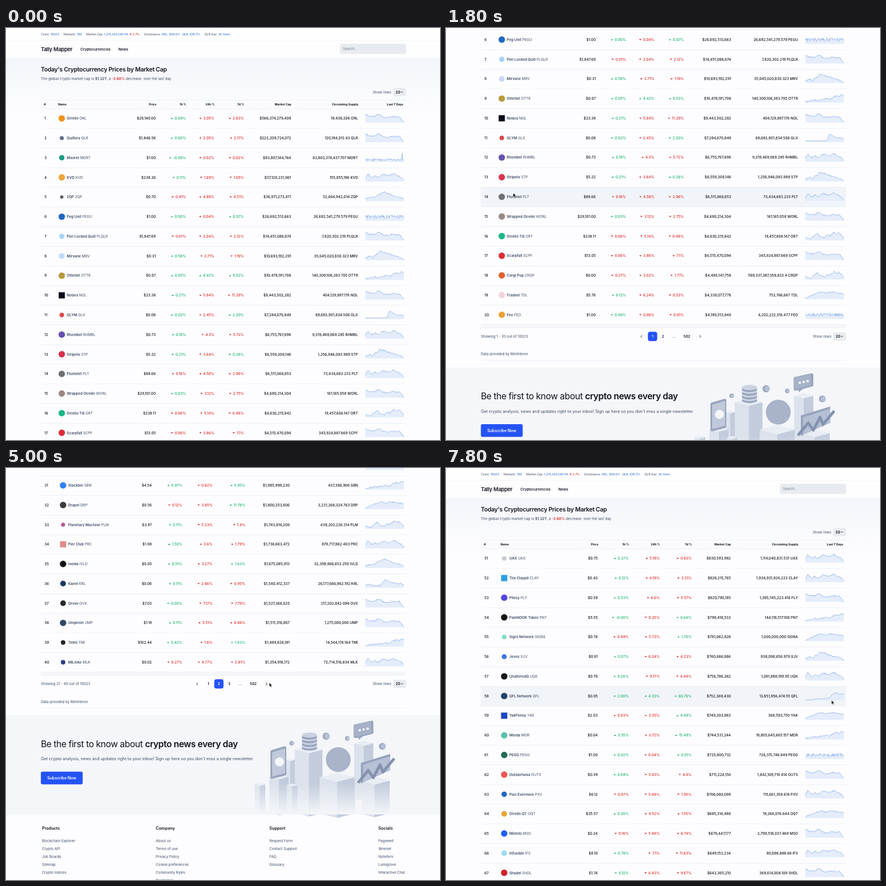
These frames come from a looping animation (768x729 px, 8000 ms). An HTML page:

```html
<!DOCTYPE html>
<html lang="en">
<head>
<meta charset="utf-8">
<title>Market table</title>
<style>
html, body { margin: 0; width: 100%; height: 100%; overflow: hidden; background: #fdfdff; }
svg { display: block; width: 100%; height: 100%; font-family: Inter, Roboto, sans-serif; }
</style>
</head>
<body>
<svg id="stage" viewBox="0 0 768 729"></svg>
<script>
const INK = '#10131c', SLATE = '#3c4962', BLUE = '#3b74d8', RED = '#e02424', GREEN = '#14b066';
const LINE = '#eceef3', CHIP = '#e8ecf0', ROW = 34.77, FIRST = 160, LOOP = 8000, STEP = 200;

function el(tag, attrs, parent) {
  const node = document.createElementNS('http://www.w3.org/2000/svg', tag);
  for (const k in attrs) node.setAttribute(k, attrs[k]);
  if (parent) parent.append(node);
  return node;
}
// Text whose capitals are centred on y; parts may be strings or { s, a }.
function text(parent, x, y, parts, size = 6.3, attrs = {}) {
  const node = el('text', { x, y: y + size * .36, 'font-size': size, fill: SLATE, ...attrs }, parent);
  for (const p of [].concat(parts)) {
    if (typeof p === 'string') node.append(p);
    else el('tspan', p.a, node).textContent = p.s;
  }
  return node;
}
const rect = (parent, x, y, width, height, fill, rx = 0) => el('rect', { x, y, width, height, fill, rx }, parent);
const rule = (parent, y) => rect(parent, 61.5, y, 646.5, .8, LINE);
const poly = (parent, points, fill) => el('path', { d: `M${points}Z`, fill }, parent);
const circle = (parent, cx, cy, r, fill) => el('circle', { cx, cy, r, fill }, parent);
const path = (parent, d, stroke, width = .9) =>
  el('path', { d, stroke, fill: 'none', 'stroke-width': width, 'stroke-linejoin': 'round' }, parent);
const show = (node, on) => node.setAttribute('display', on ? 'inline' : 'none');
const move = (node, x, y) => node.setAttribute('transform', `translate(${x} ${y})`);
const END = { 'text-anchor': 'end' }, MID = { 'text-anchor': 'middle' };
const bold = (fill = INK, weight = 600) => ({ fill, 'font-weight': weight });
const TIGHT = { 'letter-spacing': '-.025em' };

const triangle = (parent, x, y, up) =>
  poly(parent, up ? `${x - 2},${y + 1} ${x + 2},${y + 1} ${x},${y - 1.4}`
                  : `${x - 2},${y - 1} ${x + 2},${y - 1} ${x},${y + 1.4}`, up ? GREEN : RED);

function seeded(seed) {
  let s = seed * 7919 + 17;
  return () => (s = (s * 16807) % 2147483647) / 2147483647 - .5;
}

// Height profiles for the weekly charts, 0 low to 9 high.
const SHAPES = {
  M: '87666886555665630', W: '38546457766786541', H: '23344678987654432', R: '11223233443567687',
  S: '11111111118754443', N: '44444444444444444', F: '22222222222222222', C: '32135743254686752',
  P: '12345677667776665', T: '00001111122577666', J: '33322224876554442', A: '23425698866544320'
};
const ROUGH = { N: 6, F: 4, S: .8, T: 1 };

function spark(parent, y, kind, seed) {
  const shape = SHAPES[kind], rnd = seeded(seed), n = 72, rough = ROUGH[kind] || 2.4;
  let pts = '';
  for (let i = 0; i <= n; i++) {
    const u = i / n * (shape.length - 1), a = Math.min(u | 0, shape.length - 2);
    const h = +shape[a] + (shape[a + 1] - shape[a]) * (u - a);
    let py = y + 7 - h * 1.75 + rnd() * rough;
    if (kind === 'F' && i === 69) py = y - 8;
    pts += `${(636 + i / n * 68).toFixed(1)},${Math.min(py, y + 7.5).toFixed(1)} `;
  }
  poly(parent, `636,${y + 7.5} ${pts}704,${y + 7.5}`, '#e5edfb');
  path(parent, 'M' + pts, '#7ba4e4', .7);
}

// name | ticker | price | 1h | 24h | 7d | cap | supply | badge | chart
const TOP = `
Orrelin|ORL|29,140.00|+0.04|-3.05|-2.63|566,374,279,409|19,438,206|f0921e|M
Quillora|QLR|1,848.56|+0.00|-2.05|-2.17|222,209,724,072|120,194,013.43|626a8a,3.6|M
Mooret|MORT|1.00|+-0.00|-0.02|-0.02|83,807,144,764|83,803,374,437.707|1c9c84,4.8|F
KVD|KVD|238.26|+0.11|-1.69|-1.65|37,128,231,961|155,855,196|eda63c|W
ZQP|ZQP|0.70|-0.41|-4.88|-4.51|36,971,273,471|52,664,942,014|5a6068,3|H
Peg Unit|PEGU|1.00|+0.00|-0.04|+0.07|26,692,513,663|26,692,541,279.579|1f66c4|N
Pier Locked Quill|PLQLR|1,847.69|-0.01|-2.04|-2.12|14,451,086,674|7,820,302.219|a6d3f5,4.6|M
Mirvane|MRV|0.31|+0.58|-3.71|-1.19|10,693,192,291|35,045,020,830.323|c6d8f6,5|A
Otterbit|OTTR|0.07|+0.05|+4.42|+8.52|10,478,191,708|140,309,106,383.705|b99a3c|R
Nolara|NOL|23.38|+0.21|-5.84|-11.29|9,443,502,282|404,129,897.176|0c0d18,s|M
GLYM|GLX|0.08|+0.02|-2.45|+2.20|7,284,670,849|89,683,901,834.506|d7474a,4|S
Rhombel|RHMBL|0.73|+0.18|-4.3|-5.72|6,755,767,696|9,319,469,069.285|6650b0|W
Stripelo|STP|5.22|+0.21|-3.64|+0.28|6,559,309,146|1,256,946,083.989|d8344c|A
Plumelet|PLT|88.66|-0.16|-4.58|-2.96|6,511,068,653|73,434,683.233|6f7074|W
Wrapped Orrelin|WORL|29,101.00|+0.03|-3.12|-2.75|4,690,214,304|161,165.058|9a8a84|M
Orrelin Till|ORT|238.11|-0.06|-5.14|-0.48|4,630,215,842|19,457,606.147|16b888|C
Scarpfall|SCPF|13.05|-0.06|-3.86|-7.1|4,515,470,094|345,924,887.669|de2c34|M
Corgi Pup|CRGP|0.00|-0.37|-3.02|-1.71|4,490,147,758|589,337,387,358,823.4|e4622c|C
Tradeel|TDL|5.76|+0.12|-6.24|-0.53|4,338,077,778|753,766,667|f0d4dc|P
Feo|FEO|1.00|+0.00|-0.06|-0.01|4,199,513,940|4,202,222,516.477|f0a038|N`;
const SECOND = `
Stackbin|SBN|4.54|+0.97|-0.62|+5.95|1,985,998,230|437,396,906|2f80f0|R
Drapel|DRP|0.56|-0.12|-3.85|+11.78|1,800,253,606|3,231,268,324.763|3c3c3e|P
Planetary Machine|PLM|3.97|+0.11|-5.23|-1.9|1,743,814,209|439,203,226.314|b05a96,3.6|C
Pier Club|PRC|1.98|+1.50|-3.6|-1.79|1,736,663,472|878,717,862.403|e08c86,s|W
Ivelda|IVLD|0.05|+0.51|-3.27|+1.63|1,675,085,913|32,399,966,653.259|111214|H
Kairel|KRL|0.06|+0.11|-2.66|-0.95|1,540,412,337|26,177,666,962.192|1c3760,5|J
Orvex|OVX|7.03|+0.00|-7.17|-7.79|1,527,366,025|217,202,842.098|26282a,5|M
Umpirion|UMP|1.19|+0.11|-5.51|-6.86|1,511,316,807|1,275,000,000|2f4764|M
Tolmi|TMI|102.44|+0.42|-1.6|+1.63|1,489,826,181|14,544,176.164|222326,4|R
MiLinko|MLK|0.02|-0.27|-4.77|-2.81|1,354,916,172|72,714,516,834|2c3f86,4|W`;
const THIRD = `
UAX|UAX|0.75|+0.27|-5.18|-0.63|830,593,982|1,114,040,831.531|c9cccf,4|W
The Claypit|CLAY|0.43|+0.12|-6.19|-3.31|828,215,765|1,934,931,926.223|2c9fe4,s|W
Pilesy|PLY|0.59|+0.53|-6.6|-5.57|820,790,185|1,395,745,223.418|5548e0|M
PaleNOOK Token|PNT|5.55|+-0.00|-0.25|+0.64|799,418,533|144,118,517.108|141414|R
Sigra Network|SIGRA|0.78|-0.49|-5.73|+1.70|781,062,828|1,000,000,000|7fdccc,4|P
Jevos|XJV|0.81|+0.07|-6.24|-4.23|760,686,886|938,098,656.979|3a76e0,4.4|A
UnalteredQ|UQX|0.70|+0.26|-9.17|-4.44|756,786,362|1,081,888,199.95|17191b|W
QFL Network|QFL|0.05|+2.00|+4.33|+60.76|752,369,430|13,851,956,474.55|23426e|T
YakPenny|YAK|2.03|-0.63|-3.35|+4.48|749,303,983|368,593,750|1c45c0,s|P
Morda|MOR|0.04|+3.35|-3.72|+15.49|744,531,244|19,805,645,665.157|58c2ac|R
PEGG|PEGG|1.00|+0.02|-0.04|+0.01|725,800,732|726,315,746.849|246a50|N
Outskirtania|OUTS|0.39|+0.09|-5.03|-4.8|711,224,150|1,842,109,719.414|ec5a50|M
Pixo Evermore|PXV|6.12|-0.07|-5.48|-1.95|708,060,099|115,661,358.614|2166c8,4.8|W
Orrelin QT|OQT|35.57|+0.20|-4.52|-1.55|685,314,488|19,266,076.644|eaa436,5|P
Mistelo|MSO|0.24|-0.16|-5.48|-6.74|679,447,177|2,799,518,037.469|2260f4|M
Infusible|IFS|8.10|+0.78|-7.1|-11.63|649,153,234|80,088,888.66|9cdcf0,5|W
Shadel|SHDL|1.74|+0.12|-6.43|-9.67|643,365,210|369,614,008.109|d02028|M`;

function buildTable(parent, data, first, count, col) {
  const g = el('g', {}, parent), rows = data.trim().split('\n'), m = { ...END, 'font-weight': 500, fill: INK };
  const head = (x, s, a = END) => text(g, x, 135, s, 5.2, { ...bold(INK, 700), ...a });
  head(67, '#', {});
  head(col.icon - 6.5, 'Name', {});
  head(col.price + 1, 'Price');
  ['1h %', '24h %', '7d %'].forEach((s, i) => head(col.pct[i] + .7, s));
  head(col.cap + .3, 'Market Cap');
  head(623.5, 'Circulating Supply');
  head(703, 'Last 7 Days');
  for (let i = 0; i < count; i++) {
    const r = rows[i % rows.length].split('|'), y = FIRST + i * ROW, [fill, kind] = r[8].split(',');
    text(g, 68, y, String(first + i), 6.3, { 'font-weight': 500, fill: INK });
    if (kind === 's') rect(g, col.icon - 5.5, y - 5.5, 11, 11, '#' + fill, .6);
    else circle(g, col.icon, y, +kind || 5.7, '#' + fill);
    text(g, col.icon + 8.9, y, [{ s: r[0], a: bold(SLATE) }, ' ' + r[1]], 6.3);
    text(g, col.price, y, '$' + r[2], 6.3, m);
    col.pct.forEach((x, j) => {
      const v = r[3 + j], up = v[0] === '+';
      const node = text(g, x, y, v.slice(1) + '%', 6.3, { ...m, fill: up ? GREEN : RED });
      triangle(g, x - node.getComputedTextLength() - 5, y, up);
    });
    text(g, col.cap, y, '$' + r[6], 6.3, m);
    text(g, 622.8, y, `${r[7]} ${r[1]}`, 6.3, m);
    spark(g, y, r[9], first + i);
    rule(g, y + ROW / 2);
  }
  return g;
}

function rowsControl(parent, y) {
  text(parent, 681.8, y, 'Show rows', 6.3, END);
  rect(parent, 685, y - 7.5, 23, 15, CHIP, 4);
  path(parent, `M698.8 ${y - .9}l1.8 1.8l1.8 -1.8`, INK);
  return text(parent, 693.5, y, '20', 6.3, { ...MID, ...bold() });
}

function pager(parent, items, active, x0, x1) {
  const g = el('g', {}, parent), y = 859;
  path(g, `M${x0 + 1} ${y - 2.3}l-2.2 2.3l2.2 2.3M${x1 - 1} ${y - 2.3}l2.2 2.3l-2.2 2.3`, INK);
  for (const [s, x] of items) {
    if (s === active) rect(g, x - 8.2, y - 8.2, 16.4, 16.4, '#2453f5', 4);
    text(g, x, y, s, 6.3, { ...MID, ...bold(s === active ? '#fff' : INK) });
  }
  return g;
}

function buildSkyline(parent) {
  const g = el('g', { transform: 'translate(0 450)' }, parent), k = .27;
  const dark = '#98a4be', mid = '#b6c0d4', pale = '#e9edf4';
  function pillar(x, y, a, b, h) {
    const fx = x + a, fy = y + a * k, rx = fx + b, ry = fy - b * k;
    poly(g, `${x},${y} ${fx},${fy} ${fx},${fy + h} ${x},${y + h}`, '#dce2ec');
    poly(g, `${fx},${fy} ${rx},${ry} ${rx},${ry + h} ${fx},${fy + h}`, '#c3ccdd');
    poly(g, `${x},${y} ${fx},${fy} ${rx},${ry} ${x + b},${y - b * k}`, pale);
  }
  pillar(616, 514, 17, 17, 122);
  pillar(495, 543, 8, 8, 94);
  pillar(511, 525, 25, 24, 112);
  for (let y = 519; y > 498; y -= 6.5) {
    for (const [dy, fill] of [[3.4, dark], [0, '#cbd3e1']])
      el('ellipse', { cx: 537, cy: y + dy, rx: 13.5, ry: 4.6, fill }, g);
  }
  pillar(466, 573, 17, 17, 64);
  poly(g, '468,528 470,526 494,519 496,522 496,569 494,571 470,577 468,575', dark);
  poly(g, '471,530 494,523 494,567 471,573', '#c0c9da');
  circle(g, 484, 547, 8, '#f4f6fa');
  pillar(555, 574, 31, 31, 64);
  circle(g, 588, 543, 22, '#a9b4ca');
  pillar(625, 580, 27, 27, 58);
  poly(g, '628,549 680,533 680,562 628,585', mid);
  poly(g, '628,549 680,533 680,537 632,552 632,583 628,585', dark);
  path(g, 'M623 584L641 562L650 575L662 552L667 565L687 541', '#8592af', 5);
  pillar(440, 587, 9, 10, 50);
  pillar(497, 588, 9, 10, 50);
  poly(g, '616,481 648,474 650,476 650,497 631,502 624,508 624,504 616,505', dark);
  poly(g, '615,482 646,476 646,496 615,503', '#a7b2c9');
  for (const i of [0, 1, 2]) circle(g, 626 + i * 7, 491 - i * 1.4, 2.2, '#f4f6fa');
  for (const [x, y, r] of [[505.5, 514, 4], [566.5, 501.5, 6.3], [604, 505.5, 4], [666, 519.5, 6]]) {
    circle(g, x, y, r, dark);
    circle(g, x + r * .25, y, r * .75, mid);
  }
  rect(g, 436, 585, 256, 55, 'url(#fade)');
  rect(g, 618, 614, 12, 26, '#f4f6f9');
}

const stage = document.getElementById('stage'), defs = el('defs', {}, stage);
function gradient(id, stops) {
  const g = el('linearGradient', { id, x2: 0, y2: 1 }, defs);
  stops.forEach(([color, alpha], i) => el('stop', { offset: i / (stops.length - 1), 'stop-color': color, 'stop-opacity': alpha }, g));
}
gradient('fade', [['#f4f6f9', 0], ['#f4f6f9', 1]]);
gradient('hero', [['#f4f5fa', 1], ['#f9fafd', 1], ['#fdfdff', 1]]);

rect(stage, 0, 0, 768, 729, '#fdfdff');
const page = el('g', {}, stage);

// Header
rect(page, 0, 0, 768, 53, '#fefeff');
rect(page, 0, 53, 768, 110, 'url(#hero)');
rect(page, 0, 21.5, 768, .8, '#f0f1f6');
[[61.7, 'Coins: ', '10023'], [102, 'Markets: ', '780'], [142, 'Market Cap: ', '1,215,207,338.44'],
 [244.5, 'Dominance: ', 'ORL: $46.6%'], [312, '', 'QLR: $18.3%'], [351.5, 'QLR Gas: ', '35 Gwei']]
  .forEach(([x, label, s]) => text(page, x, 11.3, [label, { s, a: { fill: BLUE, 'font-weight': 500 } }], 5.23));
triangle(page, 220.3, 11.3, false);
text(page, 236.8, 11.3, '2.7%', 5.23, { ...END, fill: RED, 'font-weight': 500 });
text(page, 61.7, 37.5, 'Tally Mapper', 9.4, { ...bold(), ...TIGHT });
text(page, 131.7, 37.5, 'Cryptocurrencies', 6.3, bold());
text(page, 199, 37.5, 'News', 6.3, bold());
rect(page, 590.5, 28, 117.5, 18, CHIP, 4);
text(page, 596, 37.2, 'Search...', 6.3, { fill: '#747c8a' });
text(page, 61.7, 73, "Today's Cryptocurrency Prices by Market Cap", 10.5, { ...bold(), ...TIGHT });
text(page, 61.7, 89.6, ['The global crypto market cap is ', { s: '$1.22T', a: bold(SLATE) }, ', a ',
  { s: '-2.68%', a: bold(RED) }, ' decrease\u00a0 over the last day'], 6.3);
const topRows = rowsControl(page, 113.5);

// Tables
const glow = rect(page, 61.5, 0, 646.5, ROW, '#f1f4f8');
rule(page, 127);
rule(page, 142.3);
const tables = [
  buildTable(page, TOP, 1, 20, { icon: 98.7, price: 265, pct: [318.6, 368.8, 421], cap: 504.5 }),
  buildTable(page, SECOND, 21, 20, { icon: 101, price: 258, pct: [312, 365.6, 423.5], cap: 502 }),
  buildTable(page, THIRD, 51, 50, { icon: 103, price: 268.5, pct: [323.4, 378.2, 434.7], cap: 504 })
];

// Below the table
const foot = el('g', {}, page);
rect(foot, 61.5, 838, 646.5, 6, '#f5f6f9');
rule(foot, 837.5);
rule(foot, 843.5);
const showing = text(foot, 61.7, 859, '', 6.3);
const hover3 = rect(foot, 385, 851, 16, 16, CHIP, 4);
const pagers = [
  pager(foot, [['1', 365.5], ['2', 384], ['...', 403.3], ['502', 426.3]], '1', 346, 449.5),
  pager(foot, [['1', 356], ['2', 374.7], ['3', 393], ['...', 412.3], ['502', 435.5]], '2', 336.5, 459)
];
const lowRows = rowsControl(foot, 859);
text(foot, 61.7, 890.5, 'Data provided by MintHeron', 6.3);
rule(foot, 901);
rect(foot, 0, 914, 768, 176.5, '#f4f6f9');
buildSkyline(foot);
text(foot, 61.7, 965, ['Be the first to know about ', { s: 'crypto news every day', a: { 'font-weight': 600 } }], 15.7, { fill: INK, ...TIGHT });
text(foot, 61.7, 991.3, "Get crypto analysis, news and updates right to your inbox! Sign up here so you don't miss a single newsletter.", 7.3);
rect(foot, 61.7, 1014.3, 74, 22.5, '#2453f5', 3);
text(foot, 98.7, 1025.6, 'Subscribe Now', 7, { ...MID, ...bold('#fff') });
[[63.7, 'Products', 'Blockchain Explorer', 'Crypto API', 'Job Boards', 'Sitemap', 'Crypto Indices'],
 [265, 'Company', 'About us', 'Terms of use', 'Privacy Policy', 'Cookie preferences', 'Community Ryles', 'Disclaimer'],
 [466, 'Support', 'Request Form', 'Contact Support', 'FAQ', 'Glossary'],
 [659, 'Socials', 'Pagewell', 'Wrenlet', 'Notefern', 'Lumigrove', 'Interactive Chat']]
  .forEach(([x, title, ...links]) => {
    text(foot, x, 1114, title, 7.3, bold());
    links.forEach((s, i) => text(foot, x, 1136.6 + i * 14.05, s, 6.3));
  });

const menu = el('g', { style: 'filter: drop-shadow(0 2px 4px #28345030)' }, foot);
rect(menu, 682, 870, 29, 60, '#fff', 4);
['100', '50', '20'].forEach((s, i) => text(menu, 694.5, 881.2 + i * 18.8, s, 6.3, { ...MID, ...bold() }));

// Pointers, drawn from their hot spot
const arrow = el('path', { d: 'M0 0V6.8L1.6 5.4L2.7 7.9L3.9 7.4L2.8 5H4.8Z', fill: '#000', stroke: '#fff', 'stroke-width': .4 }, stage);
const hand = el('path', { d: 'M-.9 .4Q0 -.7 .8 .4V3L3.4 3.5Q4.6 3.9 4.4 5L3.7 8H-.6L-2.9 4.9Q-2.6 3.8 -.9 5Z',
  fill: '#fff', stroke: '#111', 'stroke-width': .8, 'stroke-linejoin': 'round' }, stage);

// Piecewise linear value from [time, ...values] keys.
function at(keys, t) {
  const i = keys.findIndex(k => k[0] > t);
  if (i < 0) return keys[keys.length - 1].slice(1);
  if (!i) return keys[0].slice(1);
  const a = keys[i - 1], b = keys[i], u = (t - a[0]) / (b[0] - a[0]);
  return a.slice(1).map((v, j) => v + (b[j + 1] - v) * u);
}
const SCROLL = [[800, 0], [1000, 8.3], [1200, 70], [1400, 165], [1600, 250], [1800, 313.3], [2000, 370],
  [2200, 418], [2400, 450], [2600, 469], [2800, 477], [7000, 477], [7200, 400], [7400, 215], [7600, 45], [7800, 0]];
const POINTER = [[400, 190, 380], [800, 119, 290.5], [1800, 119, 292], [2000, 132, 312], [2400, 278.6, 438],
  [3000, 385, 382], [3400, 389, 380], [4800, 389, 380], [5600, 697, 380], [5800, 697, 380], [6200, 698.7, 401],
  [6600, 695, 420], [6800, 695, 420], [7400, 683, 412], [7800, 682.3, 411]];

function draw(time) {
  const t = Math.floor(time % LOOP / STEP) * STEP;
  const [scroll] = at(SCROLL, t), [px, py] = at(POINTER, t);
  const picked = t >= 3400, fifty = t >= 6800;
  const shown = t >= 7000 ? 2 : t >= 4200 ? 1 : 0;
  move(page, 0, -scroll);
  tables.forEach((g, i) => show(g, i === shown));
  move(foot, 0, shown === 2 ? 30 * ROW : 0);
  showing.textContent = `Showing ${['1 - 20', '21 - 40', '51 - 100'][shown]} out of 10023`;
  show(pagers[0], !picked);
  show(pagers[1], picked);
  move(pagers[1], shown ? 2 : 0, 0);
  show(hover3, picked && t < 5000);
  show(menu, t >= 5800 && !fifty);
  topRows.textContent = lowRows.textContent = fifty ? '50' : '20';

  const pointing = t >= 3000 && t < 5000 || t >= 5600 && t < 7000;
  show(arrow, t >= 400 && !pointing);
  show(hand, pointing);
  move(pointing ? hand : arrow, px, py);
  const row = Math.floor((py + scroll - FIRST) / ROW + .5);
  show(glow, t >= 400 && !pointing && row >= 0 && row < (shown === 2 ? 50 : 20));
  glow.setAttribute('y', FIRST + (row - .5) * ROW);
}

const start = performance.now();
function tick() {
  draw(performance.now() - start);
  requestAnimationFrame(tick);
}
tick();
</script>
</body>
</html>
```
